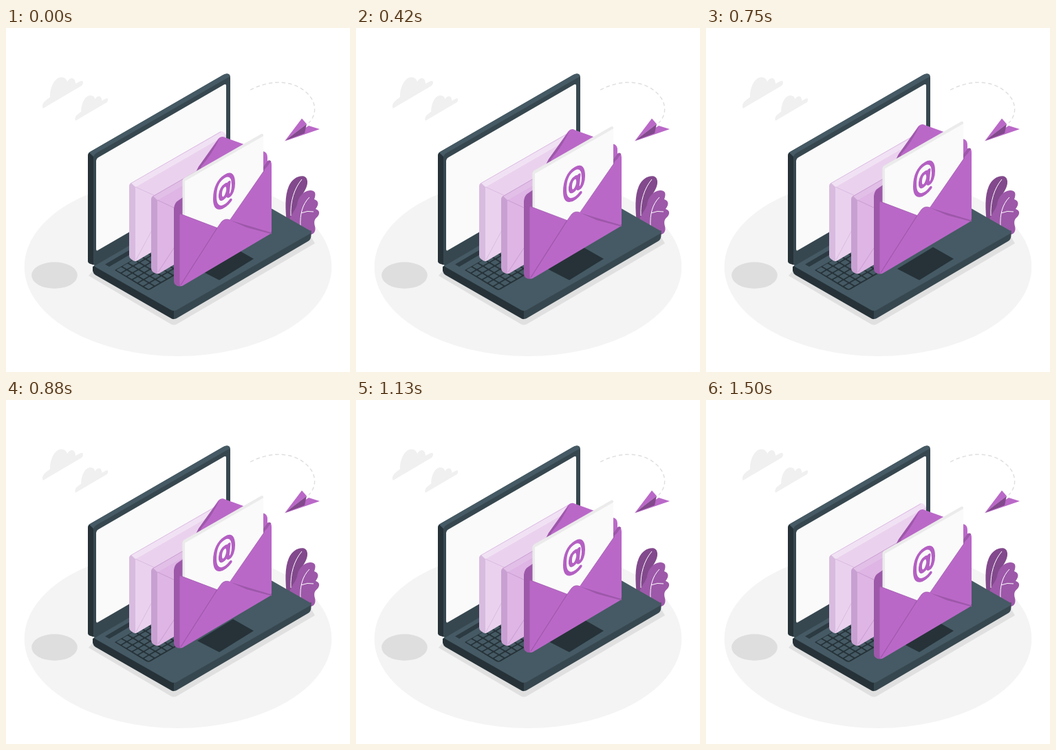
Recreate the animation shown at these times as an HTML page. Size 500 by 500 pixels, loop 1540 ms.

```html
<!DOCTYPE html>
<html lang="en">
<head>
<meta charset="utf-8">
<title>Mail on a laptop</title>
<style>
html, body { margin: 0; width: 100%; height: 100%; overflow: hidden; background: #fff; }
svg { display: block; width: 100vw; height: 100vh; }
</style>
</head>
<body>
<svg viewBox="0 0 500 500">
  <defs>
    <path id="cloud" d="M53 115V112Q54 108 58 105L64 100.500C63.500 88 70 72 80 71.500C86 71.500 88 75 89 78C92 72.500 98 71 100 76C100.500 78 101 79 101 81L108 77.300Q112 75.500 112 79Q112 83 108 85L57 115Q53 118 53 115Z"/>
  </defs>

  <ellipse cx="250" cy="347" rx="223.300" ry="130" fill="#f4f4f4"/>
  <ellipse cx="70.500" cy="359.500" rx="33.300" ry="19.300" fill="#dedede"/>
  <g fill="#f0f0f0">
    <use href="#cloud"/>
    <use href="#cloud" transform="translate(57.500 40.200) scale(.81)"/>
  </g>

  <!-- paper plane -->
  <path d="M355 90C385 74 418 76 437 94C452 108 452 126 440 138" fill="none" stroke="#dedede" stroke-width="1.400" stroke-dasharray="5.500 4"/>
  <path d="M405 164.500L440 142L456 147Z" fill="#ba68c8"/>
  <path d="M405 164.500L430 131.500L437 139.500Z" fill="#ba68c8"/>
  <path d="M406 163.500L437 139.500L434 153Z" fill="#82498c"/>

  <!-- plant -->
  <path d="M408 284C406 262 405 244 411 230C416 219 425 214 433 215.500C440 218 439 228 435 235C428 247 420 262 416 285Z" fill="#82498c"/>
  <path d="M411 282C413 272 420 266 423 257C424 247 431 237 442 236C450 236 451 241 448 249C455 251 455 257 450 263C456 265 457 270 452 275C447 279 448 284 449 288C451 296 447 301 440 300Z" fill="#9d58a9"/>
  <g fill="none" stroke="#fff" stroke-width="1">
    <path d="M430 220C419 233 413 252 414 273"/>
    <path d="M441 246C431 256 427 270 428 289M429 269Q438 265 447 267"/>
  </g>

  <!-- laptop -->
  <path d="M120 360L127 352L244 420L443 303L449 313L249 430Q244 433 239 430Z" fill="#e0e0e0"/>
  <path d="M244 405L443.500 294V302Q443 308 439 310L248 422Q244 424 240 422Z" fill="#37474f"/>
  <path d="M126 347V353Q127 357 130 359L240 422Q242 423 244 423.300V405L132 343Z" fill="#263238"/>
  <path d="M130 343L332 231.500L441 294Q446 296.500 441 299.500L248 410Q244 412 240 410L131 348Q126 345 130 343Z" fill="#455a64"/>
  <path d="M119 338V186Q119 182 122 180L315 68.500Q321 65 325 68Q326 69 326 73V231L130 345L122 342.500Q119 341 119 338Z" fill="#37474f"/>
  <path d="M119 338V186Q119 183 121 181L127 185V344L122 342.500Q119 341 119 338Z" fill="#263238"/>
  <path d="M121 181L315 68.500Q321 65 325 68L324.500 71L131 182Q128 184 127 187Z" fill="#455a64"/>
  <path d="M131 193Q131 190 134 188.300L317 82.300Q320 80.500 320 84V215L134 322.700Q131 325 131 321Z" fill="#fafafa"/>
  <path d="M144 343.500L179 323L220 300V306L150 347Z" fill="#2c3a42"/>
  <path d="M158 352L262 292L312 321L210 380Q207 381.500 204 380Z" fill="#263238"/>
  <g id="keys" transform="matrix(8.100 4.800 9 -5.200 158.500 351.700)" fill="#455a64"/>
  <path d="M278 350L330 318.500L360 335.500L310 366.500Z" fill="#263238"/>

  <!-- rear envelope -->
  <path d="M188 231L320 155V262L191 338Q188 340 186 338Z" fill="#ead2ee"/>
  <path d="M181 226L310 151Q313 149 316 151L320 155L188 231Z" fill="#f1e1f4"/>
  <path d="M179 230Q179 226 182 225.500L188 231V339Q185 339 182 336Q179 334 179 331Z" fill="#d8bbdf"/>
  <path d="M181 226L312 151M188 231L217 244M189 337L212 294" fill="none" stroke="#d9b8e0" stroke-width=".9"/>

  <!-- middle envelope -->
  <path d="M220 250L300 204V311L223 356.500Q220 358 218 356Z" fill="#deb5e4"/>
  <path d="M213 245L300 195V204L220 250Z" fill="#e1bfe7"/>
  <path d="M211 249Q211 245 214 244.500L220 250V357.500Q216 357 213 354Q211 352 211 349Z" fill="#c9a0d2"/>
  <path d="M213 245L290 200.500M220 250L250 264M221 355L255 303" fill="none" stroke="#c799d0" stroke-width=".9"/>

  <!-- front envelope -->
  <g id="mail">
    <path d="M258 246L280 201.500L308.500 161Q313 156 318 159L376 180Q380 182 380 188V210L310 290Z" fill="#ba68c8"/>
    <path d="M244 266V262Q245 254 250 251L258 245.500L280 201.500L311 159Q299 184 284 201L262 290H244Z" fill="#9d58a9"/>
    <path d="M256.500 222Q256.500 219.500 259 218L371 154Q374 153 374 156V230L310 310L256.500 280Z" fill="#ebebeb"/>
    <path d="M260 222.500L374 157V230L310 310L260 280Z" fill="#fafafa"/>
    <path transform="matrix(1 -.577 0 1 317 238)" fill="none" stroke="#b45fc3" stroke-width="5" stroke-linecap="round" d="M9 18C2 24 -13.500 23 -13.500 1C-13.500 -14 -8 -22 1 -22C10 -22 13.500 -14 13.500 -3C13.500 5 11 10 8 10C5 10 5 7 5.500 4L7 -9M5.600 0C4.500 6 1.500 9 -1 9C-4.500 9 -6 5 -5.500 0C-5 -6 -2 -9 1.500 -9C4.500 -9 6.300 -5 5.600 0"/>
    <path d="M244 265Q245 259 249 260L254 268V375.500Q249 376 246 373Q244 371 244 368Z" fill="#9d58a9"/>
    <path d="M252.500 272Q253 269 256 271L307 290.500L313 282Q318 276 325.500 279L380 200Q382 195 384 193Q386 195 386 199V294Q386 298 383 300L257 374.500Q253 377 252.500 372Z" fill="#ba68c8"/>
    <path d="M374 207V202L380 193.500Q383 191 385.500 194Q382 197 380 201Z" fill="#9d58a9"/>
    <g fill="none" stroke="#9d58a9" stroke-width="1.200">
      <path d="M307 290.500L254 373.500"/>
      <path d="M254 270.500L307 290.500L313 282Q318 276 325.500 279L376 206" stroke-width=".7"/>
    </g>
    <path d="M326 279.500L386 297.500V299.500L350 290Z" fill="#9d58a9"/>
  </g>
</svg>
<script>
const LOOP = 1540, STEP = 125 / 3, LAST = 36;
const PEAK = 721, RISE = 20, START = 1.27;
const mail = document.getElementById("mail");
const keys = document.getElementById("keys");

let cells = "";
for (let row = 0; row < 6; row++) {
  for (let col = 0; col < 11; col++) {
    cells += `<rect x="${row + .1}" y="${col + .1}" width=".8" height=".8" rx=".1"/>`;
  }
}
keys.innerHTML = cells;

// Linear bob at 24 steps per second
function draw(now) {
  const step = Math.min(LAST, Math.floor((now % LOOP + 6) / STEP));
  const gap = Math.abs(step * STEP - PEAK);
  const dist = Math.min(gap, LOOP - gap);
  const lift = RISE * (1 - dist / (LOOP / 2)) - START;
  mail.setAttribute("transform", `translate(0 ${-lift.toFixed(2)})`);
}

let begin;
function tick(now) {
  begin ??= now;
  draw(now - begin);
  requestAnimationFrame(tick);
}
draw(0);
requestAnimationFrame(tick);
</script>
</body>
</html>
```
